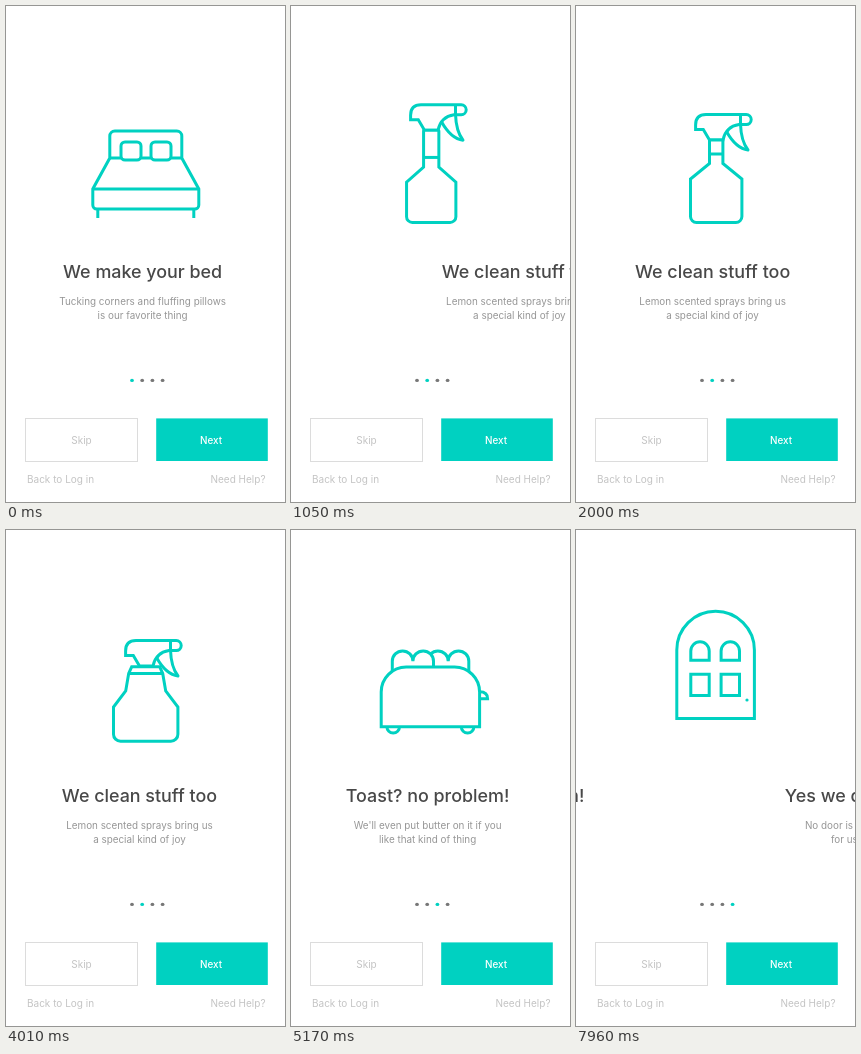
Animation of 279x496 px, one loop 8000 ms. Source, as an HTML page with a canvas:

```html
<!DOCTYPE html>
<html lang="en">
<head>
<meta charset="utf-8">
<title>Onboarding</title>
<style>
html, body { margin: 0; width: 100%; height: 100%; overflow: hidden; background: #fff; }
canvas { display: block; width: 279px; height: 496px; }
</style>
</head>
<body>
<canvas id="stage"></canvas>
<script>
const W = 279, H = 496, LOOP = 8000, TICK = 77.7, START = 500, PAGE = 353;
const TEAL = '#00d1c1', FONT = 'Inter, sans-serif';
const canvas = document.getElementById('stage');
const ctx = canvas.getContext('2d');
const dpr = window.devicePixelRatio || 1;
canvas.width = W * dpr;
canvas.height = H * dpr;

const pages = [
  ['We make your bed', 'Tucking corners and fluffing pillows', 'is our favorite thing'],
  ['We clean stuff too', 'Lemon scented sprays bring us', 'a special kind of joy'],
  ['Toast? no problem!', "We'll even put butter on it if you", 'like that kind of thing'],
  ['Yes we do doors', 'No door is too narrow', 'for us now']
];
const turns = [0, 45, 90]; // ticks at which a page turn begins
const slide = [.009, .05, .13, .241, .36, .48, .595, .74, .87, .96, 1];

// Silhouettes: centre, top radius, bottom radius, then (half width, y) pairs downwards.
const BED = [139.8, 5, 4, 36, 125, 36, 152, 53, 183, 53, 190, 53, 203];
const JAR = [140.4, 5, 4, 15.7, 174, 15.7, 181, 15.7, 191.5, 15.7, 204, 15.7, 216.5];
const BOTTLE = [140.2, 0, 6, 6.7, 134, 6.7, 148, 6.7, 157.5, 25.7, 173, 25.7, 216.5];
const SQUAT = [139.7, 0, 7, 14, 136.8, 17, 143.5, 20, 161, 32.2, 177, 32.2, 211.2];
const TOASTER = [139.4, 25, 0, 49.2, 137, 49.2, 164, 49.2, 172, 49.2, 184, 49.2, 196.8];
const LIFTED = [139.6, 25, 0, 48.3, 131.5, 48.3, 158, 48.3, 166, 48.3, 178, 48.3, 190.5];
const DOOR = [139.6, 38.8, 0, 38.8, 81.3, 38.8, 130, 38.8, 150, 38.8, 170, 38.8, 188.5];

const clamp = v => Math.max(0, Math.min(1, v));
const lerp = (a, b, e) => a + (b - a) * e;
const mix = (a, b, e) => a.map((v, i) => lerp(v, b[i], e));
const smooth = v => { v = clamp(v); return v * v * (3 - 2 * v); };

function text(str, x, y, size, color, align = 'center', weight = 400) {
  ctx.font = `${weight} ${size}px ${FONT}`;
  ctx.fillStyle = color;
  ctx.textAlign = align;
  ctx.fillText(str, x, y);
}

function path(draw, fill = true) {
  ctx.beginPath();
  draw();
  if (fill) { ctx.fillStyle = '#fff'; ctx.fill(); }
  ctx.stroke();
}

const line = (x1, y1, x2, y2) => path(() => { ctx.moveTo(x1, y1); ctx.lineTo(x2, y2); }, false);

function dot(x, y, r, color = TEAL) {
  ctx.fillStyle = color;
  ctx.beginPath();
  ctx.arc(x, y, r, 0, 7);
  ctx.fill();
}

function body(s) {
  const [cx, top, bottom] = s, right = [], left = [];
  for (let i = 3; i < s.length; i += 2) {
    right.push([cx + s[i], s[i + 1]]);
    left.unshift([cx - s[i], s[i + 1]]);
  }
  const pts = [...right, ...left, [cx, s[4]]];
  path(() => {
    ctx.moveTo(cx, s[4]);
    for (let i = 0; i < 10; i++) {
      const r = i === 0 || i === 9 ? top : i === 4 || i === 5 ? bottom : 0;
      ctx.arcTo(...pts[i], ...pts[i + 1], r);
    }
    ctx.closePath();
  });
}

// Cross line at the silhouette's i-th level.
function band(s, i) {
  const w = s[3 + 2 * i], y = s[4 + 2 * i];
  line(s[0] - w, y, s[0] + w, y);
}

function sprayHead(dy, size, pull) {
  if (size <= 0) return;
  ctx.save();
  ctx.translate(140, 134 + dy);
  ctx.scale(size, size);
  ctx.translate(-140, -134);
  ctx.save();
  ctx.translate(157, 120);
  ctx.rotate(pull);
  ctx.translate(-157, -120);
  ctx.lineJoin = 'round';
  path(() => {
    ctx.moveTo(164.5, 118);
    ctx.quadraticCurveTo(165, 135, 172, 144);
    ctx.quadraticCurveTo(160, 142.5, 150.5, 125.5);
  });
  ctx.restore();
  path(() => {
    ctx.moveTo(133.5, 134);
    ctx.lineTo(127.3, 123.6);
    ctx.lineTo(119.6, 123.6);
    ctx.lineTo(119.6, 119);
    ctx.quadraticCurveTo(119.6, 108.6, 130, 108.6);
    ctx.lineTo(170.2, 108.6);
    ctx.arc(170.2, 113.6, 5, -Math.PI / 2, Math.PI / 2);
    ctx.lineTo(163, 118.6);
    ctx.quadraticCurveTo(150, 120.5, 147, 134);
    ctx.closePath();
  });
  line(164.5, 108.6, 164.5, 118.6);
  ctx.restore();
}

function pillows(e) {
  for (const side of [-1, 1]) {
    const x = 140 + side * lerp(15, 9, e), y = lerp(145, 150, e);
    if (e < .6) {
      const w = lerp(20, 3, e), h = lerp(18, 26, e);
      path(() => ctx.roundRect(x - w / 2, y - h / 2, w, h, Math.min(4, w / 2)));
    } else {
      for (let i = -2; i <= 2; i++) dot(x - .6, y + i * 6.1, 1.5);
    }
  }
}

function bedToBottle(k) {
  const fold = k < 0 ? 0 : [.08, .35, .7, 1][Math.min(k, 3)];
  if (k <= 3) {
    const s = mix(BED, JAR, fold), leg = 9 * (1 - fold * 1.3);
    if (leg > 0) {
      for (const x of [-48, 48]) line(s[0] + x * s[9] / 53, s[12], s[0] + x * s[9] / 53, s[12] + leg);
    }
    body(s);
    band(s, 1);
    band(s, 2);
    pillows(fold);
    return;
  }
  const grow = smooth((k - 3) / 5), s = mix(JAR, BOTTLE, grow);
  const hop = k >= 6 ? [-6, -14, -7, 2, 0][k - 6] : 0;
  s[4] += hop;
  if (k === 4) {
    for (const side of [-1, 1]) {
      for (let i = 0; i < 5; i++) dot(140 + side * 8, 118 + i * 7, 1.5 - i * .15);
    }
  }
  sprayHead(s[4] - 134, smooth((k - 4) / 3), 0);
  body(s);
  band(s, 1);
  if (k < 6) band(s, 2);
}

function bottle(k) {
  const busy = k > 0 && k < 8;
  sprayHead(0, 1, busy ? .28 * Math.sin(Math.PI * k / 8) : 0);
  body(BOTTLE);
  band(BOTTLE, 1);
  if (!busy) return;
  for (let ray = -1; ray <= 1; ray++) {
    for (let i = 0; i < 4; i++) {
      const d = (k - 1) * 8 - i * 7;
      if (d >= 0 && d < 40) dot(182 + d, 113.5 + ray * (2 + d * .27), 1.5);
    }
  }
}

function toast(x, y) {
  path(() => {
    ctx.arc(x + 10.3, y, 10.3, Math.PI, 0);
    ctx.arc(x + 30.9, y, 10.3, Math.PI, 0);
    ctx.lineTo(x + 41.2, y + 14);
    ctx.lineTo(x, y + 14);
    ctx.closePath();
  });
}

function toaster(s, toastY, extras) {
  const bottom = s[12], edge = s[0] + s[11];
  if (toastY < 150) {
    toast(136.6, toastY);
    toast(101.3, toastY);
  }
  if (extras > 0) {
    for (const side of [-1, 1]) {
      path(() => ctx.arc(s[0] + side * 37.2, bottom, 6.3 * extras, 0, Math.PI));
    }
    path(() => {
      ctx.moveTo(edge, bottom - 35);
      ctx.quadraticCurveTo(edge + 8 * extras, bottom - 35, edge + 8 * extras, bottom - 28);
      ctx.lineTo(edge, bottom - 28);
    });
  }
  body(s);
}

function bottleToToaster(k) {
  const e = smooth(k / 8), s = mix(SQUAT, TOASTER, e);
  if (k < 5) {
    sprayHead(s[4] - 134.8 + k * 3, 1 - smooth(k / 5), 0);
    body(s);
    band(s, 1);
    return;
  }
  const pop = [20, 8, -6, -12, -9, -3, 3, 2, 0];
  const dy = k < 7 ? 30 : pop[Math.min(k - 7, 8)];
  toaster(s, 131.2 + dy, clamp((k - 4) / 4));
}

function windows(size) {
  for (const x of [124, 154.3]) {
    const w = 9.2 * size;
    path(() => {
      ctx.moveTo(x - w, 121 + w);
      ctx.lineTo(x - w, 121);
      ctx.arc(x, 121, w, Math.PI, 0);
      ctx.lineTo(x + w, 121 + w);
      ctx.closePath();
    });
    path(() => ctx.rect(x - w, 154.8 - w * 1.15, 2 * w, w * 2.3));
  }
  dot(171, 170, 1.6 * size);
}

function toasterToDoor(k) {
  const s = mix(LIFTED, DOOR, smooth(k / 5));
  s[4] = lerp(LIFTED[4], DOOR[4], [0, .1, .35, .8, 1.3, 1.12, 1][Math.min(k, 6)]);
  toaster(s, 129.9 + k * 9, .78 - k * .3);
  if (k >= 3) windows(clamp((k - 2) / 3));
}

function icon(n) {
  ctx.strokeStyle = TEAL;
  ctx.lineWidth = 3;
  ctx.lineJoin = 'miter';
  ctx.miterLimit = 4;
  if (n <= 10) bedToBottle(n);
  else if (n < turns[1]) bottle(n - 11);
  else if (n < turns[2]) bottleToToaster(n - turns[1]);
  else toasterToDoor(n - turns[2]);
}

function captions(scroll) {
  pages.forEach(([title, first, second], i) => {
    const x = 136.6 + (i - scroll) * PAGE;
    if (Math.abs(x - W / 2) > W) return;
    text(title, x, 272, 17.9, '#484848', 'center', 500);
    text(first, x, 299.3, 9.9, '#969696');
    text(second, x, 312.5, 9.9, '#969696');
  });
}

function controls(active) {
  for (let i = 0; i < 4; i++) {
    ctx.fillStyle = i === active ? TEAL : '#777';
    ctx.beginPath();
    ctx.ellipse(126 + i * 10.2, 374.4, 1.9, 1.6, 0, 0, 7);
    ctx.fill();
  }
  ctx.strokeStyle = '#dcdcdc';
  ctx.lineWidth = 1;
  ctx.strokeRect(19.5, 412.5, 112, 43);
  ctx.fillStyle = TEAL;
  ctx.fillRect(150.2, 412.4, 111.6, 42.6);
  text('Skip', 75.5, 438, 10, '#c4c4c4');
  text('Next', 205, 438, 9.9, '#fff', 'center', 500);
  text('Back to Log in', 21, 477, 10, '#c4c4c4', 'left');
  text('Need Help?', 259.5, 477, 10, '#c4c4c4', 'right');
}

function render(t) {
  const n = Math.floor((t - START) / TICK);
  let scroll = 0, active = 0;
  for (const turn of turns) {
    const k = n - turn;
    if (k >= 0) scroll += slide[Math.min(k, 10)];
    if (k >= 2) active++;
  }
  ctx.setTransform(dpr, 0, 0, dpr, 0, 0);
  ctx.fillStyle = '#fff';
  ctx.fillRect(0, 0, W, H);
  icon(n);
  captions(scroll);
  controls(active);
}

const origin = performance.now();
function loop() {
  render((performance.now() - origin) % LOOP);
  requestAnimationFrame(loop);
}
loop();
</script>
</body>
</html>
```
